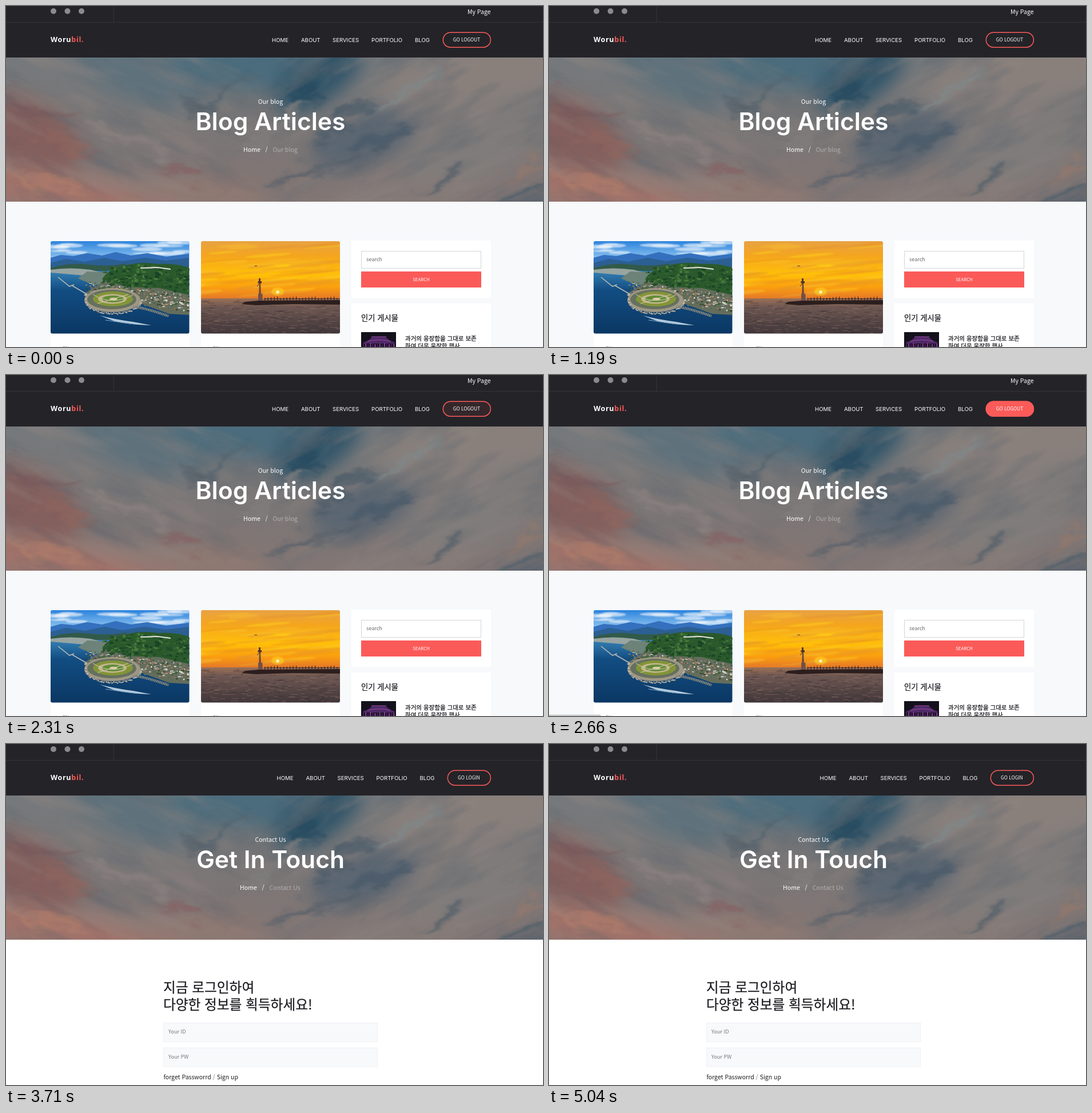
An HTML page for the animation above (5.11 s loop, 939 by 596 pixels).

```html
<!DOCTYPE html>
<html lang="ko">
<head>
<meta charset="utf-8">
<title>Blog Articles</title>
<style>
  html, body { margin: 0; width: 100%; height: 100%; overflow: hidden; background: #fff; }
  svg { display: block; width: 100vw; height: 100vh; }
  text { white-space: pre; }
  filter { color-interpolation-filters: sRGB; }
  .body { font-family: "Noto Sans CJK KR", "Noto Sans CJK JP", "Noto Sans CJK", "Noto Sans", sans-serif; }
  .head { font-family: Inter, "Open Sans", sans-serif; }
  .logo { font-family: "Open Sans", "Noto Sans", sans-serif; font-weight: 700; letter-spacing: .7px; }
</style>
</head>
<body>
<svg id="stage" viewBox="0 0 939 596" xmlns="http://www.w3.org/2000/svg"></svg>
<script>
const LOOP = 5110, TICK = 70;
const HOVER_START = 2310, HOVER_STEPS = 6, LOGIN_AT = 2800;
const ACCENT = '#fa5b59', INK = '#1c1b20';

function seeded(seed) {
  return () => (seed = (seed * 16807) % 2147483647) / 2147483647;
}

const rect = (x, y, w, h, fill, extra = '') =>
  `<rect x="${x}" y="${y}" width="${w}" height="${h}" fill="${fill}" ${extra}/>`;
const path = (d, fill, extra = '') => `<path d="${d}" fill="${fill}" ${extra}/>`;
const line = (d, color, width, extra = '') =>
  path(d, 'none', `stroke="${color}" stroke-width="${width}" ${extra}`);
const oval = (x, y, rx, ry, fill, extra = '') =>
  `<ellipse cx="${x}" cy="${y}" rx="${rx}" ry="${ry}" fill="${fill}" ${extra}/>`;
const text = (x, y, size, str, fill = '#fff', cls = 'body', extra = '') =>
  `<text x="${x}" y="${y}" font-size="${size}" fill="${fill}" class="${cls}" ${extra}>${str}</text>`;
const MID = 'text-anchor="middle"', END = 'text-anchor="end"';
const MEDIUM = `font-weight="500" stroke="${INK}" stroke-width=".25"`;

function gradient(id, stops, axis = 'x2="0" y2="1"') {
  const list = stops.map(([at, color]) => `<stop offset="${at}" stop-color="${color}"/>`).join('');
  return `<linearGradient id="${id}" ${axis}>${list}</linearGradient>`;
}

// Streaky noise in one colour; the noise itself becomes the opacity
function streaks(id, freq, seed, [r, g, b], gain, cut) {
  return `<filter id="${id}" x="0" y="0" width="100%" height="100%">
    <feTurbulence type="fractalNoise" baseFrequency="${freq}" numOctaves="5" seed="${seed}"/>
    <feColorMatrix values="0 0 0 0 ${r}  0 0 0 0 ${g}  0 0 0 0 ${b}  ${gain} 0 0 0 ${-gain * cut}"/>
  </filter>`;
}

function defs() {
  return `<defs>
    ${gradient('dusk', [[0, '#75797c'], [.5, '#7b7777'], [1, '#827674']])}
    ${gradient('day', [[0, '#2c83dc'], [.6, '#8cc2f0'], [1, '#c4def2']])}
    ${gradient('ocean', [[0, '#3580b4'], [.3, '#124d82'], [1, '#0b3763']])}
    ${gradient('sunset', [[0, '#e8a244'], [.25, '#f4a51e'], [.58, '#ffc008'], [.8, '#fa9d10'], [1, '#e3742b']])}
    ${gradient('evening', [[0, '#9b7056'], [.25, '#6d5752'], [1, '#40363a']])}
    ${gradient('toRight', [[.35, '#000'], [.6, '#fff']], '')}
    ${gradient('toLeft', [[.35, '#fff'], [.6, '#000']], '')}
    <mask id="leftHalf">${rect(0, 90, 939, 252, 'url(#toLeft)')}</mask>
    <mask id="rightHalf">${rect(0, 90, 939, 252, 'url(#toRight)')}</mask>
    ${streaks('pale', '.006 .026', 11, [.58, .53, .51], 3, .5)}
    ${streaks('slate', '.007 .024', 23, [.28, .35, .41], 3, .52)}
    <filter id="cloud" x="-5%" y="-20%" width="110%" height="140%">
      <feTurbulence type="fractalNoise" baseFrequency=".014 .026" numOctaves="5" seed="7" result="n"/>
      <feGaussianBlur in="SourceGraphic" stdDeviation="5" result="b"/>
      <feDisplacementMap in="b" in2="n" scale="70" xChannelSelector="R" yChannelSelector="G"/>
    </filter>
    <filter id="soft"><feGaussianBlur stdDeviation="1.2"/></filter>
    <filter id="haze" x="-20%" y="-60%" width="140%" height="220%"><feGaussianBlur stdDeviation="17"/></filter>
    <clipPath id="heroBox"><rect y="90" width="939" height="252"/></clipPath>
    <clipPath id="coastBox"><rect x="78" y="411" width="242.5" height="161.5" rx="3"/></clipPath>
    <clipPath id="pierBox"><rect x="341" y="411" width="243" height="161.5" rx="3"/></clipPath>
  </defs>`;
}

// Dimmed evening sky behind the page title
function hero() {
  const washes = [
    [430, 100, 150, 45, 0, '#4a6c7d'], [235, 125, 120, 42, 18, '#5f727c'],
    [545, 125, 88, 42, -35, '#2f5469'], [30, 225, 105, 62, 22, '#835f5d'],
    [110, 328, 190, 34, 8, '#a1736a'], [340, 325, 120, 26, 0, '#917a73'],
    [840, 115, 190, 60, -12, '#89807c'], [625, 235, 100, 40, -20, '#5a6672'],
    [920, 342, 70, 12, -12, '#45596a'], [810, 255, 130, 55, -18, '#807c7b'],
    [700, 325, 130, 22, -8, '#847b78']
  ];
  const wisps = [
    [330, 168, 40, 11, 28, '#56616b'], [385, 155, 44, 8, -30, '#536570'],
    [535, 140, 58, 20, -48, '#284b60'], [590, 200, 66, 17, -28, '#4b5c6a'],
    [655, 232, 60, 16, -22, '#4a5a69'], [545, 283, 88, 8, -8, '#535e69'],
    [765, 295, 48, 7, -26, '#535f6a'], [300, 292, 44, 7, 14, '#865f62'],
    [60, 180, 64, 11, 22, '#7b5b5c'], [105, 240, 72, 9, 24, '#8f655e'],
    [70, 305, 80, 8, 16, '#b07d6b'], [215, 235, 80, 9, 24, '#8b8180'],
    [470, 210, 70, 11, -34, '#83807f'], [700, 145, 74, 8, -28, '#7f888b'],
    [910, 280, 46, 4, -18, '#a07a67'], [910, 330, 60, 5, -14, '#465c69']
  ];
  const blob = ([x, y, rx, ry, turn, color]) =>
    oval(x, y, rx, ry, color, `transform="rotate(${turn} ${x} ${y})"`);
  const fan = (side, turn, x) => `<g mask="url(#${side}Half)"><g transform="rotate(${turn} ${x} 216)">
    ${rect(x - 420, -90, 840, 612, '#fff', 'filter="url(#pale)" opacity=".4"')}
    ${rect(x - 420, -90, 840, 612, '#fff', 'filter="url(#slate)" opacity=".3"')}</g></g>`;
  return `<g clip-path="url(#heroBox)">
    ${rect(0, 90, 939, 252, 'url(#dusk)')}
    <g filter="url(#haze)">${washes.map(blob).join('')}</g>
    <g filter="url(#cloud)" opacity=".75">${wisps.map(blob).join('')}</g>
    ${fan('left', 24, 235)}${fan('right', -28, 705)}
  </g>`;
}

function coast() {
  const rnd = seeded(41);
  let sky = '', trees = '', town = '', wall = '';
  for (let i = 0; i < 18; i++) {
    sky += oval(80 + rnd() * 240, 413 + rnd() * 20, 10 + rnd() * 22, 1.2 + rnd() * 2.6, '#f3f8fc', 'opacity=".65"');
  }
  for (let i = 0; i < 190; i++) {
    const x = 168 + rnd() * 154;
    const top = 452 + Math.abs(x - 235) * .09;
    trees += oval(x, top + rnd() * 42, 1.5 + rnd() * 3, 1 + rnd() * 1.8, ['#1b4426', '#31632f', '#4a7a3c', '#244d29'][i % 4]);
  }
  for (let i = 0; i < 420; i++) {
    const x = 136 + rnd() * 184;
    const y = 481 + (x - 136) * .13 + rnd() * 28;
    town += rect(x, y, 1.5 + rnd() * 3.5, .8 + rnd() * 1.8, ['#e0ddd3', '#a09a8f', '#b0765a', '#3c5f39', '#65747b', '#37462f'][i % 6]);
  }
  for (let i = 0; i < 90; i++) {
    const a = Math.PI * (.02 + i / 90);
    wall += oval(187 + 49 * Math.cos(a) + rnd() * 2, 513 + 23 * Math.sin(a) + rnd() * 3, 1.4, 1, i % 2 ? '#cfc7b6' : '#888379');
  }
  return `<g clip-path="url(#coastBox)">
    ${rect(78, 411, 243, 50, 'url(#day)')}<g filter="url(#soft)">${sky}</g>
    ${path('M78 440 L96 435 L118 437 L142 432 L168 436 L192 430 L219 436 L247 432 L280 438 L320 433 V470 H78Z', '#3470bd')}
    ${path('M78 449 L105 442 L138 447 L172 440 L204 446 L242 440 L280 445 L320 440 V475 H78Z', '#2c5f92')}
    ${path('M78 458 Q110 448 145 452 T210 450 V476 H78Z', '#315a49')}
    ${rect(78, 463, 243, 110, 'url(#ocean)')}
    ${path('M78 461 Q112 456 148 461 L175 468 L148 472 L78 466Z', '#98a5a2')}
    ${path('M126 476 L142 464 L185 466 L180 486 L152 488Z', '#6d8279')}
    ${path('M138 502 L180 476 L320 484 V540 L285 538 L238 521 L200 533 L158 529 L138 514Z', '#646d5b')}
    ${path('M168 478 Q176 461 207 454 Q238 446 265 451 Q293 449 320 457 V505 L268 493 L213 491Z', '#2a592c')}
    ${trees}${town}
    ${line('M235 458 L265 457 L288 460', '#e1e3da', 2.2)}
    ${oval(186, 514, 49, 21, '#9f9785')}${oval(185, 513, 43, 17, '#66705f')}
    ${oval(187, 512, 35, 13, '#839437')}${oval(186, 512, 25, 8.5, '#c0b78e')}
    ${oval(187, 512, 19, 6, '#638b36')}${oval(188, 512, 7, 2.2, '#dad0a6')}
    ${line('M152 504 Q184 525 222 505 M160 520 L214 504', '#cfc8ae', 1)}
    ${wall}
    ${line('M222 525 Q248 529 284 542', '#8f8c7d', 4.5, 'stroke-dasharray="2 1"')}
    ${line('M116 489 L142 504 M91 474 L111 490 L119 487', '#b9bab1', 1.6)}
    ${path('M164 541 Q191 548 222 552 L254 558 Q214 557 190 551Z', '#c8dbea', 'opacity=".9"')}
    ${line('M174 549 Q203 553 224 556', '#7ba6c4', 1.2)}
  </g>`;
}

function pier() {
  const rnd = seeded(93);
  let clouds = '', waves = '', posts = '';
  for (let i = 0; i < 50; i++) {
    const y = 413 + rnd() * 92;
    const color = ['#f9bd30', '#e39230', '#ffd31a', '#f0981a'][i % 4];
    clouds += oval(340 + rnd() * 245, y, 18 + rnd() * 42, .8 + rnd() * 2.6, color,
      `opacity=".5" transform="rotate(-5 462 ${y})"`);
  }
  for (let i = 0; i < 260; i++) {
    const y = 513 + rnd() * 59;
    waves += rect(336 + rnd() * 245, y, 3 + rnd() * 11, 1, i % 2 ? '#a37a66' : '#2f292d', 'opacity=".42"');
  }
  for (let x = 452; x < 584; x += 5.5) posts += rect(x, 508 + (x % 3), 1.2, 8, '#35231e');
  return `<g clip-path="url(#pierBox)">
    ${rect(341, 411, 243, 102, 'url(#sunset)')}
    <g filter="url(#soft)">${clouds}</g>
    ${oval(475, 499, 11, 7, '#ffd528', 'opacity=".6" filter="url(#soft)"')}
    ${oval(475, 500, 2.8, 2.8, '#fff6b4')}
    ${rect(341, 511, 243, 62, 'url(#evening)')}${waves}
    ${path('M412 521 L418 517 L442 515 L584 514 V522 L500 521 L437 523Z', '#2b1e1e')}
    ${posts}${rect(452, 511, 132, .8, '#35231e')}
    ${path('M442 515 L442.8 484 H445 L446.5 515Z', '#6d463a')}
    ${rect(440.5, 481, 6.5, 3.5, '#4d302a')}${rect(442, 476, 3, 6, '#5a372d')}
    ${rect(441, 503, 7.5, 12, '#744f45')}
    ${line('M439 490 L445 483', '#4d302a', 1)}
    ${line('M434.5 454 L437 454.6 L439 453.8', '#4a351c', 1)}
  </g>`;
}

function thumbnail() {
  let lights = '';
  for (let i = 0; i < 14; i++) lights += rect(624 + i * 4.1, 589 + (i % 3), 2, 7, i % 2 ? '#8d3a9c' : '#43205a');
  return rect(621, 570, 61, 26, '#14111c') +
    path('M624 588 Q636 585 640 578 H664 Q669 585 680 588 L678 590 H626Z', '#4f2a66') +
    line('M639 578 H665 M632 586 Q652 581 672 586', '#a24fb0', .9) + lights;
}

function header(nav, label, left) {
  const icons = [83, 107.5, 132].map(x => oval(x, 9, 5, 5, '#8b8a8e')).join('');
  const items = ['HOME', 'ABOUT', 'SERVICES', 'PORTFOLIO', 'BLOG']
    .map((str, i) => text(nav + [0, 51, 106, 174, 250][i], 62.5, 9.6, str, '#fff', 'head')).join('');
  const button = (fill, extra) =>
    rect(left + .8, 46.2, 846.6 - left, 26, fill, `rx="13" stroke="${ACCENT}" stroke-width="1.5" ${extra}`);
  return rect(0, 0, 939, 90, '#242328') +
    rect(0, 28, 939, 1, '#343338') + rect(188, 0, 1, 28, '#343338') + icons +
    text(78, 63, 12.5, `Woru<tspan fill="${ACCENT}">bil.</tspan>`, '#fff', 'logo') + items +
    button('none', '') + (left === 763.5 ? button(ACCENT, 'id="fill"') : '') +
    text((left + 847.5) / 2, 62, 8.3, label, '#fff', 'body', MID);
}

function title(small, big, home) {
  return text(462.5, 171, 10.6, small, '#fff', 'body', MID) +
    text(462.5, 217, 42.6, big, '#fff', 'head', `${MID} font-weight="600"`) +
    text(home, 255, 10.6, 'Home') + text(home + 38.5, 255, 10.6, '/') +
    text(home + 51.5, 255, 10.6, small, '#b1afb0');
}

function blogPage() {
  const card = x => rect(x, 560, 243, 36, '#fff') +
    text(x + 21, 602, 9, '5%', '#777') + text(x + 44, 602.5, 9, 'by writer', '#777');
  return rect(0, 342, 939, 254, '#f7f9fb') +
    header(465, 'GO LOGOUT', 763.5) + text(847.5, 14, 10.5, 'My Page', '#fff', 'body', END) +
    title('Our blog', 'Blog Articles', 415) +
    card(78) + card(341) + coast() + pier() +
    rect(604, 410, 244, 100, '#fff') + rect(604, 520, 244, 76, '#fff') +
    rect(621.5, 428.5, 209, 30, '#fff', 'stroke="#d3d5d7"') +
    text(630, 446, 9.1, 'search', '#686868') +
    rect(621, 464, 210, 28, ACCENT) + text(726, 480.8, 7.8, 'SEARCH', '#fff', 'body', MID) +
    text(621, 549.5, 13.3, '인기 게시물', INK, 'body', MEDIUM) + thumbnail() +
    text(698, 585, 10.5, '과거의 웅장함을 그대로 보존', INK, 'body', MEDIUM) +
    text(698, 598, 10.5, '하여 더욱 웅장한 행사', INK, 'body', MEDIUM) +
    path('M0 593.5 H88 Q91 593.5 91 596 H0Z', '#c9cbcd', 'id="status"');
}

function loginPage() {
  const field = (y, str) => rect(275.5, y + .5, 374, 33, '#f7f9fb', 'stroke="#eef1f4"') +
    text(284, y + 19.3, 9.1, str, '#77777b');
  return rect(0, 342, 939, 254, '#fff') +
    header(473.5, 'GO LOGIN', 771.5) + title('Contact Us', 'Get In Touch', 409) +
    text(275, 434, 23.7, '지금 로그인하여', INK, 'body', MEDIUM) +
    text(275, 464, 23.7, '다양한 정보를 획득하세요!', INK, 'body', MEDIUM) +
    field(487, 'Your ID') + field(530.5, 'Your PW') +
    text(275.5, 586.3, 10.5, 'forget Passworrd <tspan fill="#777">/</tspan> Sign up', INK);
}

const stage = document.getElementById('stage');
stage.innerHTML = defs() + hero() + `<g id="blog">${blogPage()}</g><g id="login">${loginPage()}</g>`;
const [blog, login, fill, status] = ['blog', 'login', 'fill', 'status'].map(id => document.getElementById(id));

function draw(ms) {
  const onLogin = ms >= LOGIN_AT;
  blog.style.display = onLogin ? 'none' : '';
  login.style.display = onLogin ? '' : 'none';
  const step = Math.floor((ms - HOVER_START) / TICK) + 1;
  const k = Math.min(1, Math.max(0, step / HOVER_STEPS));
  const hover = k * k * (3 - 2 * k);
  fill.setAttribute('opacity', hover);
  status.setAttribute('opacity', hover);
}

const start = performance.now();
function frame() {
  draw((performance.now() - start) % LOOP);
  requestAnimationFrame(frame);
}
frame();
</script>
</body>
</html>
```
